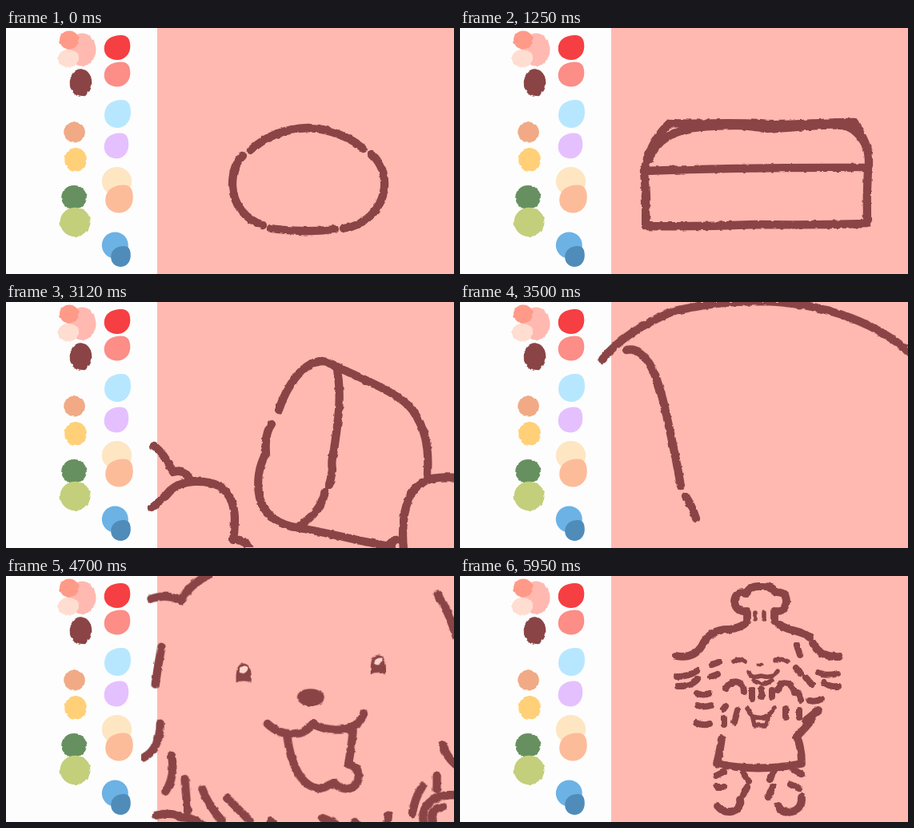
Write an HTML page without scripts that moves like this. It is 560 by 308 pixels and loops after 6 s.

```html
<!DOCTYPE html>
<html lang="en">
<head>
<meta charset="utf-8">
<title>Baking dog</title>
<style>
html, body { margin: 0; width: 100%; height: 100%; overflow: hidden; background: #fdfdfd; }
svg { display: block; width: 560px; height: 308px; }
.ink path { fill: none; stroke: #8a4446; stroke-width: 10.3; stroke-linecap: round; stroke-linejoin: round; vector-effect: non-scaling-stroke; }
.ink .solid { fill: #8a4446; stroke: none; }
.ink .glint { fill: #ffd5cc; stroke: none; }
.ink .tick { stroke: #ffb9b0; stroke-width: 8; }
#dog path { stroke-width: 9.8; }
#dog .mid { stroke-width: 8; }
#dog .thin { stroke-width: 5.5; }

.scene, .move, .loaf path { animation: 6s infinite; }
.scene { visibility: hidden; animation-timing-function: step-end; }
.move, .loaf path { animation-timing-function: ease-in-out; }

/* which scene is on stage */
#dough { animation-name: s1; }
#bake  { animation-name: s2; }
#hold  { animation-name: s3; }
#close { animation-name: s4; }
#face  { animation-name: s5; }
#dog   { animation-name: s6; }
@keyframes s1 { 0% { visibility: visible } 10.6%, 100% { visibility: hidden } }
@keyframes s2 { 0% { visibility: hidden } 10.6% { visibility: visible } 42%, 100% { visibility: hidden } }
@keyframes s3 { 0% { visibility: hidden } 42% { visibility: visible } 57.5%, 100% { visibility: hidden } }
@keyframes s4 { 0% { visibility: hidden } 57.5% { visibility: visible } 72.3%, 100% { visibility: hidden } }
@keyframes s5 { 0% { visibility: hidden } 72.3% { visibility: visible } 94%, 100% { visibility: hidden } }
@keyframes s6 { 0% { visibility: hidden } 94%, 100% { visibility: visible } }

/* dough hops, then lands wide as a loaf */
#dough .move { transform-origin: 378px 256px; animation-name: hop; }
@keyframes hop {
  0%, .7% { transform: none }
  3% { transform: scale(1.17, .72) }
  6.3% { transform: translateY(-100px) scale(.9, 1.12) }
  8.2% { transform: translateY(-70px) scale(.95, 1.05) }
  10.6%, 100% { transform: scale(1.15, .8) }
}
#bake .move { transform-origin: 370px 250px; animation-name: land; }
@keyframes land {
  0%, 10.6% { transform: scale(.8, 1.2) }
  13% { transform: scale(1.16, .72) }
  15.5% { transform: scale(.94, 1.14) }
  18% { transform: scale(1.04, .95) }
  20.8%, 37.8% { transform: none }
  42%, 100% { transform: translateY(18px) scale(1, .97) }
}

/* the loaf rises */
.outer { animation-name: outer !important; }
.inner { animation-name: inner !important; }
.lid { animation-name: lid !important; }
.base { animation-name: base !important; }
@keyframes outer {
  0%, 21.2% { d: path("M231 176C236 150 250 130 262 119C300 121 350 117 385 121C420 122 460 117 493 118C500 132 512 145 511 172") }
  26% { d: path("M230 170C224 130 230 102 255 84C285 63 340 61 375 61C420 61 450 68 475 78C505 93 515 125 510 172") }
  28.5% { d: path("M230 172C228 155 233 136 255 120C285 101 340 98 375 98C420 98 450 104 475 112C500 125 511 140 510 172") }
  31.2% { d: path("M230 173C228 148 233 126 255 110C285 92 340 91 375 91C420 91 450 97 475 105C500 118 511 134 510 172") }
  37%, 100% { d: path("M229 186C228 160 233 140 255 124C285 105 340 104 375 104C420 104 450 110 475 117C500 130 511 145 510 186") }
}
@keyframes inner {
  0%, 21.2% { d: path("M236 165C245 140 268 127 300 124C340 121 360 121 385 127C420 124 455 120 480 122C495 126 505 140 511 155") }
  26% { d: path("M230 170C224 130 230 102 255 84C285 63 340 61 375 61C420 61 450 68 475 78C505 93 515 125 510 172") }
  28.5% { d: path("M230 172C228 155 233 136 255 120C285 101 340 98 375 98C420 98 450 104 475 112C500 125 511 140 510 172") }
  31.2% { d: path("M230 173C228 148 233 126 255 110C285 92 340 91 375 91C420 91 450 97 475 105C500 118 511 134 510 172") }
  37%, 100% { d: path("M229 186C228 160 233 140 255 124C285 105 340 104 375 104C420 104 450 110 475 117C500 130 511 145 510 186") }
}
@keyframes lid {
  0%, 31.2% { d: path("M230 179Q370 174 510 175") }
  37%, 100% { d: path("M229 191Q370 189 510 189") }
}
@keyframes base {
  0%, 31.2% { d: path("M230 179Q233 210 232 248Q300 249 370 246Q440 247 509 245Q508 210 510 176") }
  34.5% { d: path("M229 188Q233 240 232 291Q300 291 370 295Q440 294 508 292Q508 240 510 187") }
  37%, 100% { d: path("M229 191Q233 230 232 278Q300 278 400 282Q450 281 508 279Q509 230 510 189") }
}

/* paws lift the bread */
.bread { transform-origin: 420px 200px; animation-name: lift; }
.left { animation-name: left; }
.right { animation-name: right; }
@keyframes lift {
  0%, 42% { transform: translate(-30px, 40px) rotate(-14deg) scale(.9) }
  47% { transform: translateY(-4px) rotate(4deg) }
  51.7%, 52.4% { transform: none }
  57.5%, 100% { transform: translateY(-60px) rotate(-6deg) scale(1.15) }
}
@keyframes left {
  0%, 42% { transform: translate(-20px, 150px) }
  47% { transform: translate(4px, -5px) }
  51.7%, 52.4% { transform: none }
  57.5%, 100% { transform: translate(-6px, -40px) }
}
@keyframes right {
  0%, 42% { transform: translate(60px, 110px) }
  47% { transform: translate(-4px, -4px) }
  51.7%, 52.4% { transform: none }
  57.5%, 100% { transform: translate(10px, -40px) }
}

/* close view, then tilt down to the face */
#close .move { transform-origin: 378px 100px; animation-name: tilt; }
@keyframes tilt {
  0%, 57.5% { transform: translateY(-50px) }
  60.5% { transform: translateY(4px) }
  62.5%, 66.2% { transform: none }
  72.3%, 100% { transform: translateY(-120px) }
}
#face .move { transform-origin: 381px 112px; animation-name: chew; }
@keyframes chew {
  0%, 72.3% { transform: translateY(70px) }
  75.7% { transform: translateY(-6px) }
  78.5% { transform: translateY(5px) rotate(1deg) }
  81.5% { transform: translateY(-4px) rotate(-1deg) }
  85.3%, 89.7% { transform: none; animation-timing-function: ease-in }
  94%, 100% { transform: translate(-3px, -3px) scale(.78) }
}
#dog .move { transform-origin: 375px 106px; animation-name: zoom; animation-timing-function: linear; }
@keyframes zoom {
  0%, 94% { transform: scale(2.4) }
  97.2% { transform: scale(1.37) }
  99.1%, 100% { transform: none }
}
</style>
</head>
<body>
<svg viewBox="0 0 560 308">
  <defs>
    <filter id="rough" filterUnits="userSpaceOnUse" x="0" y="0" width="560" height="308" color-interpolation-filters="sRGB">
      <feTurbulence type="fractalNoise" baseFrequency=".17" seed="4"/>
      <feDisplacementMap in="SourceGraphic" scale="3.6" xChannelSelector="R" yChannelSelector="G"/>
    </filter>
    <clipPath id="stage"><rect x="169" width="391" height="308"/></clipPath>
    <path id="blob" d="M-1 .1C-1-.6-.5-.95.2-1C.8-1.05 1-.7 1-.1C1 .6.5 1 0 1C-.6 1-1 .6-1 .1Z"/>
  </defs>
  <rect width="560" height="308" fill="#fdfdfd"/>
  <rect x="189" width="371" height="308" fill="#ffb9b0"/>

  <g filter="url(#rough)">
    <ellipse cx="95" cy="27" rx="17.500" ry="20.500" fill="#ffb9b0"/>
    <ellipse cx="79" cy="15" rx="12" ry="11.500" fill="#ff9a88"/>
    <ellipse cx="78" cy="38" rx="13" ry="11" fill="#ffddd0"/>
    <ellipse cx="93.500" cy="68.500" rx="13.800" ry="17.300" fill="#8a4446"/>
    <ellipse cx="85.500" cy="130.500" rx="13.300" ry="13" fill="#f1aa85"/>
    <ellipse cx="87" cy="165" rx="13.800" ry="15" fill="#ffd078"/>
    <ellipse cx="85" cy="212" rx="15.800" ry="15" fill="#66905f"/>
    <ellipse cx="86.500" cy="243" rx="19" ry="18.300" fill="#c3cf7b"/>
  </g>
  <use href="#blob" transform="translate(139 24.500) scale(16.300 15.500)" fill="#f63f42"/>
  <use href="#blob" transform="translate(139 58) scale(16.300 15.500)" fill="#fc8d87"/>
  <use href="#blob" transform="translate(139.500 107.500) scale(16.500 17.500)" fill="#b7e7ff"/>
  <use href="#blob" transform="translate(138 147.500) scale(15.300 16)" fill="#e5c0ff"/>
  <ellipse cx="138.500" cy="192" rx="18.700" ry="18" fill="#fee6c3"/>
  <use href="#blob" transform="translate(141.500 214) scale(17.300 17.500)" fill="#fdbc99"/>
  <circle cx="136.300" cy="272" r="16.500" fill="#6cb2e5"/>
  <use href="#blob" transform="translate(143.500 286) scale(12.300 13)" fill="#4f8cba"/>

  <g class="ink" clip-path="url(#stage)"><g filter="url(#rough)">
    <g id="dough" class="scene"><g class="move">
      <path d="M306 153C325 135 350 126 378 125C405 126 432 138 447 151M457 158C470 170 474 185 473 200C470 228 447 248 422 251M411 252Q370 257 331 251M321 247C300 240 284 222 283 197C283 178 288 167 296 160"/>
    </g></g>

    <g id="bake" class="scene"><g class="move loaf">
      <path class="outer"/><path class="inner"/><path class="lid"/><path class="base"/>
    </g></g>

    <g id="hold" class="scene">
      <g class="move bread">
        <path d="M341 135C350 108 370 74 396 74Q405 75 414 83M408 78C440 95 490 112 508 135C524 158 529 180 527 216"/>
        <path d="M414 85C420 120 415 150 410 185Q406 200 408 210Q406 222 404 229M399 237C395 255 385 268 366 281"/>
        <path d="M332 153Q323 165 325 190C316 205 313 225 317 245C324 270 345 280 366 283C410 290 450 302 482 306"/>
      </g>
      <g class="move left"><path d="M185 180Q198 190 209 213Q222 208 229 221M182 258Q195 248 205 236C220 222 250 222 268 231C290 248 287 275 284 298Q300 296 306 312"/></g>
      <g class="move right"><path d="M497 310C494 280 498 250 510 235C522 220 540 218 566 220M478 305Q486 295 495 299"/></g>
    </g>

    <g id="close" class="scene"><g class="move">
      <ellipse class="solid" cx="368" cy="-10" rx="69" ry="27"/>
      <path class="tick" d="M344-4L339 9M390-5L394 4"/>
      <path d="M178 113Q205 78 268 52C320 41 350 40 380 40C440 42 510 58 566 107M208 101C232 96 245 130 254 165Q268 225 276 271M282 284Q290 296 295 312"/>
    </g></g>

    <g id="face" class="scene"><g class="move">
      <path d="M180 27Q200 20 217 29Q225 11 252-5M538 15Q553 38 562 68"/>
      <path d="M194 87Q190 110 187 134M194 183Q194 215 174 226M209 223Q214 250 202 268M226 252Q228 275 230 292M248 264Q256 285 273 303M279 275Q290 285 308 303M191 298Q210 293 222 300Q238 300 250 310M334 303L343 312"/>
      <path d="M548 204Q552 218 564 228M541 242V259M523 256Q514 270 511 290M481 293Q481 303 474 312M439 302Q443 305 445 312M399 298Q412 302 424 311M564 266Q535 266 526 285Q522 296 528 309M549 281Q532 284 536 300L542 312"/>
      <g id="eye">
        <path class="solid" d="M288 130Q286 106 297 106Q308 106 307 130Q298 126 288 130Z"/>
        <path class="glint" d="M292 117Q290 109 297 110Q304 108 302 114Q298 121 292 117Z"/>
      </g>
      <use href="#eye" x="168" y="-13.500"/>
      <ellipse class="solid" cx="381.500" cy="147" rx="17" ry="10.800"/>
      <path d="M328 181C345 197 375 198 385 179Q393 186 410 187C430 188 445 180 448 166M353 197C358 230 371 260 395 261C405 259 408 254 413 254C425 266 443 261 443 245Q442 232 430 230Q434 205 435 188"/>
    </g></g>

    <g id="dog" class="scene"><g class="move">
      <path d="M358 44Q345 46 343 32Q344 18 358 22Q362 12 376 13Q392 12 394 21Q408 18 408 32Q406 46 393 44"/>
      <path class="thin" d="M369 46V54M380 46V54"/>
      <path d="M270 100Q292 104 302 88Q312 67 335 67Q352 65 359 57V46M393 46V56Q402 65 420 69Q432 72 437 77M441 84Q450 102 474 101"/>
      <path class="mid" d="M271 126Q286 126 296 119M272 138Q290 138 297 129M296 147Q304 150 312 147M315 111L323 108M314 126L322 123M297 162Q305 165 314 162M295 184Q305 188 312 185M329 167L332 163M330 178V186"/>
      <path class="mid" d="M421 87L425 99M448 121Q457 126 472 122M455 133Q460 139 473 138M432 127L440 136M420 115L426 122M437 156Q445 158 452 154M422 146L426 155M424 168V177"/>
      <path class="thin" d="M342 107Q349 102 356 107M394 106Q402 102 410 107M361 120Q363 129 376 125Q392 129 397 119M367 131Q380 139 390 131"/>
      <ellipse class="solid" cx="375" cy="111" rx="4.500" ry="2.500"/>
      <path class="mid" d="M332 141Q338 130 348 133Q355 137 355 145M397 143Q398 132 410 135Q417 138 418 146"/>
      <path class="mid" d="M365 143V154M377 142V151M390 143V151M347 168L343 183M407 166V177"/>
      <path class="thin" d="M359 166L365 175Q376 180 386 175L393 165M366 178L368 187H383L385 178"/>
      <path d="M327 204Q325 220 321 235Q372 246 427 235Q427 215 421 201Q432 190 440 180M448 168L432 181"/>
      <path d="M322 288Q330 298 343 294Q352 288 350 280M427 277Q428 292 415 295Q402 298 398 288"/>
      <path class="mid" d="M330 245L320 250M321 264L330 264M354 247L361 257M359 264L354 274M392 246L387 255M416 242L427 248M391 264L385 277M413 261L424 266"/>
    </g></g>
  </g></g>
</svg>
</body>
</html>
```
